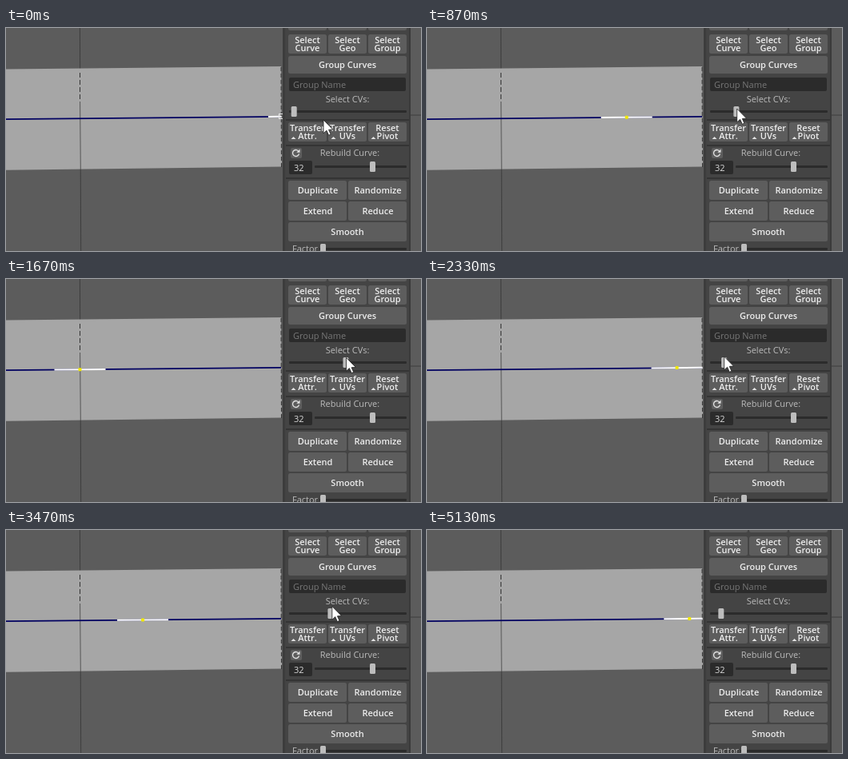
Write an HTML page with a canvas that moves like this. It is 519x279 px and loops after 5.19 s.

```html
<!DOCTYPE html>
<html lang="en">
<head>
<meta charset="utf-8">
<title>Select CVs slider</title>
<style>
html, body { margin: 0; width: 100%; height: 100%; overflow: hidden; background: #5c5c5c; }
canvas { display: block; }
</style>
</head>
<body>
<canvas id="stage" width="519" height="279"></canvas>
<script>
const ctx = document.getElementById('stage').getContext('2d');
const LOOP = 5190, STEP = 200 / 3;
const FONT = '"Open Sans", "Noto Sans", sans-serif';
const RELEASE = 65, HIDE = 69;

const smooth = u => u * u * (3 - 2 * u);
const slowing = u => 1 - (1 - u) ** 1.5;
const speeding = u => u ** 3;

// The pointer drags the slider back and forth, then leaves
const MOVES = [
  { from: 0, to: 8, x: 360.5, y: 102, ease: smooth },
  { from: 9.5, to: 19, x: 449, y: 99, ease: smooth },
  { from: 22, to: 36.5, x: 369, y: 97, ease: slowing },
  { from: 37, to: 45, x: 461, y: 96, ease: smooth },
  { from: 45, to: 61, x: 369, y: 95, ease: slowing },
  { from: RELEASE, to: 68, x: 418, y: 244, ease: speeding }
];

function pointer(step) {
  let x = 397, y = 115;
  for (const m of MOVES) {
    const u = Math.min(1, Math.max(0, (step - m.from) / (m.to - m.from)));
    x += (m.x - x) * m.ease(u);
    y += (m.y - y) * m.ease(u);
  }
  return { x, y };
}

const handleX = v => 360.2 + 3.81 * v;
const valueAt = x => Math.max(0, Math.round((x - handleX(0)) / 3.81));

// Control points sit closer together at the end of the curve
const pointX = v => 344 - 15.72 * (v < 2 ? v / 3 : v - 1);
const curveY = x => 114.2 - 3.4 * x / 344;

function rect(x, y, w, h, fill, r = 0) {
  ctx.fillStyle = fill;
  ctx.beginPath();
  ctx.roundRect(x, y, w, h, r);
  ctx.fill();
}

function line(x1, y1, x2, y2, color, width = 1, dash = []) {
  ctx.strokeStyle = color;
  ctx.lineWidth = width;
  ctx.setLineDash(dash);
  ctx.beginPath();
  ctx.moveTo(x1, y1);
  ctx.lineTo(x2, y2);
  ctx.stroke();
  ctx.setLineDash([]);
}

function poly(points, fill) {
  ctx.fillStyle = fill;
  ctx.beginPath();
  points.forEach(([x, y]) => ctx.lineTo(x, y));
  ctx.closePath();
  ctx.fill();
}

function text(str, x, y, color = '#bbbbbb', align = 'left', weight = 400) {
  ctx.font = `${weight} 11px ${FONT}`;
  ctx.textAlign = align;
  ctx.fillStyle = color;
  ctx.fillText(str, x, y);
}

function button(x, y, w, h, ...labels) {
  rect(x, y, w, h, '#5d5d5d', 2.5);
  const base = y + h / 2 + 4 - (labels.length - 1) * 5;
  const mid = Math.round(x + w / 2);
  labels.forEach((s, i) => text(s, mid, base + i * 10, '#eeeeee', 'center', 600));
}

function slider(x, y, handle) {
  rect(x, y - 1.5, 501 - x, 3, '#2b2b2b', 1);
  rect(handle - 3.5, y - 6.5, 7, 13, '#bdbdbd', 1.5);
}

function viewport(v) {
  rect(0, 0, 519, 279, '#5c5c5c');
  line(92.4, 0, 93.7, 279, '#3d3d3d');
  poly([[0, 51.5], [344, 48], [345, 173.5], [0, 177.7]], '#a6a6a6');
  line(92.6, 92, 93.3, 177, '#555555');
  line(92.5, 56, 92.5, 92, '#333333', 1, [6, 3]);
  line(344, 49, 344.5, 174, '#333333', 1, [5, 3]);

  line(0, curveY(0), 344, curveY(344), '#000060', 1.8);
  const x = pointX(v);
  const reach = v === 0 ? 16 : 32;
  const from = x - reach, to = Math.min(344.5, x + reach);
  if (to > 0) line(from, curveY(from), to, curveY(to), '#ffffff', 2);
  if (v === 0) {
    ctx.strokeStyle = '#e8e8e8';
    ctx.lineWidth = 1;
    ctx.strokeRect(341.5, 107.5, 6, 6);
  } else {
    rect(x - 2, curveY(x) - 2, 4, 4, '#f0e800', 1);
  }
}

function refreshIcon() {
  rect(356, 150, 14, 13, '#5d5d5d', 2);
  ctx.strokeStyle = '#e4e4e4';
  ctx.lineWidth = 1.3;
  ctx.beginPath();
  ctx.arc(362.5, 156.5, 4, 0.2, Math.PI * 1.75);
  ctx.stroke();
  poly([[367.5, 151.5], [367.5, 155.7], [363.3, 155.7]], '#e4e4e4');
}

function panel(v) {
  rect(349, 0, 156, 279, '#444444');
  rect(346, 0, 3, 279, '#3c3c3c');
  rect(504, 0, 2, 279, '#3a3a3a');
  line(506, 109, 519, 109, '#3d3d3d');

  const columns = [353, 403, 453];
  columns.forEach(x => button(x, -20, 48, 23));
  ['Curve', 'Geo', 'Group'].forEach((s, i) => button(columns[i], 8, 48, 24, 'Select', s));
  button(353, 35, 148, 22, 'Group Curves');
  rect(354, 62, 146, 17, '#2b2b2b', 2);
  text('Group Name', 359, 75, '#777777');
  text('Select CVs:', 427, 93, '#bbbbbb', 'center');
  slider(354, 104.5, handleX(v));

  [115, 147, 188].forEach(y => line(350, y, 504, y, '#343434', 2));
  [['Transfer', 'Attr.'], ['Transfer', 'UVs'], ['Reset', 'Pivot']].forEach((labels, i) => {
    const x = columns[i];
    button(x, 118, 48, 24, ...labels);
    poly([[x + 3.5, 139], [x + 6.5, 136], [x + 9.5, 139]], '#e4e4e4');
  });

  refreshIcon();
  text('Rebuild Curve:', 430, 160, '#bbbbbb', 'center');
  rect(354, 166, 29, 17, '#2b2b2b', 2);
  text('32', 360, 179, '#d8d8d8');
  slider(386, 173.5, 458.5);

  [['Duplicate', 'Randomize'], ['Extend', 'Reduce']].forEach((row, j) =>
    row.forEach((s, i) => button(353 + 75 * i, 191 + 26 * j, 73, 24, s)));
  button(353, 243, 148, 24, 'Smooth');
  text('Factor', 358, 280);
  slider(392, 276.5, 396.5);
}

function cursor({ x, y }) {
  const shape = [[0, 0], [0, 16.8], [3.9, 13.2], [6.6, 19.2], [9.2, 18.1], [6.6, 12.3], [11.8, 12]];
  poly(shape.map(([dx, dy]) => [x + dx, y + dy]), '#ffffff');
  ctx.strokeStyle = '#202020';
  ctx.lineWidth = 0.8;
  ctx.stroke();
}

function draw(ms) {
  const step = Math.floor((ms % LOOP + 3.4) / STEP);
  const v = valueAt(pointer(Math.min(step, RELEASE)).x);
  viewport(step < MOVES[1].from ? 0 : v);
  panel(step < MOVES[1].from ? 0 : v);
  if (step < HIDE) cursor(pointer(step));
}

const start = performance.now();
function tick() {
  draw(performance.now() - start);
  requestAnimationFrame(tick);
}
tick();
</script>
</body>
</html>
```
